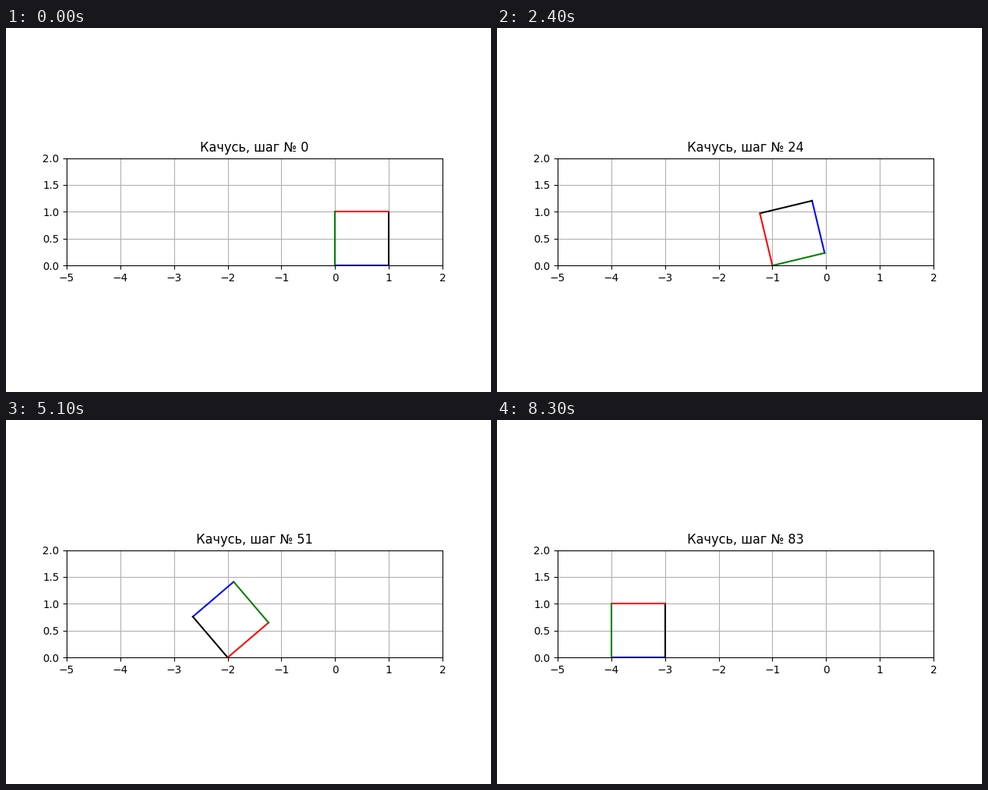
A matplotlib script for the animation above (8.4 s loop, 640 px wide and 480 px high).

```python
import numpy as np
import matplotlib.pyplot as plt
from matplotlib.animation import FuncAnimation

ROLLS = 4
STEPS = 21  # poses per quarter turn, both ends included
COLORS = ["blue", "black", "red", "green"]  # bottom, right, top, left
CORNERS = np.array([0, 1, 1 + 1j, 1j])

fig, ax = plt.subplots(figsize=(6.4, 4.8), dpi=100)
ax.set_aspect("equal")
ax.set_xlim(-5, 2)
ax.set_ylim(0, 2)
ax.grid(True)
title = ax.set_title("")
sides = [ax.plot([], [], color=c, lw=1.5)[0] for c in COLORS]


def draw(step):
    roll, pose = divmod(step, STEPS)
    angle = np.pi / 2 * pose / (STEPS - 1)
    points = -roll + CORNERS * np.exp(1j * angle)
    for i, side in enumerate(sides):
        a = (i + roll) % 4
        ends = points[[a, (a + 1) % 4]]
        side.set_data(ends.real, ends.imag)
    title.set_text(f"Качусь, шаг № {step}")
    return [*sides, title]


def init():
    return draw(0)


anim = FuncAnimation(fig, draw, frames=ROLLS * STEPS, init_func=init,
                     interval=100, repeat=True, repeat_delay=0, blit=False)
plt.show()
```
